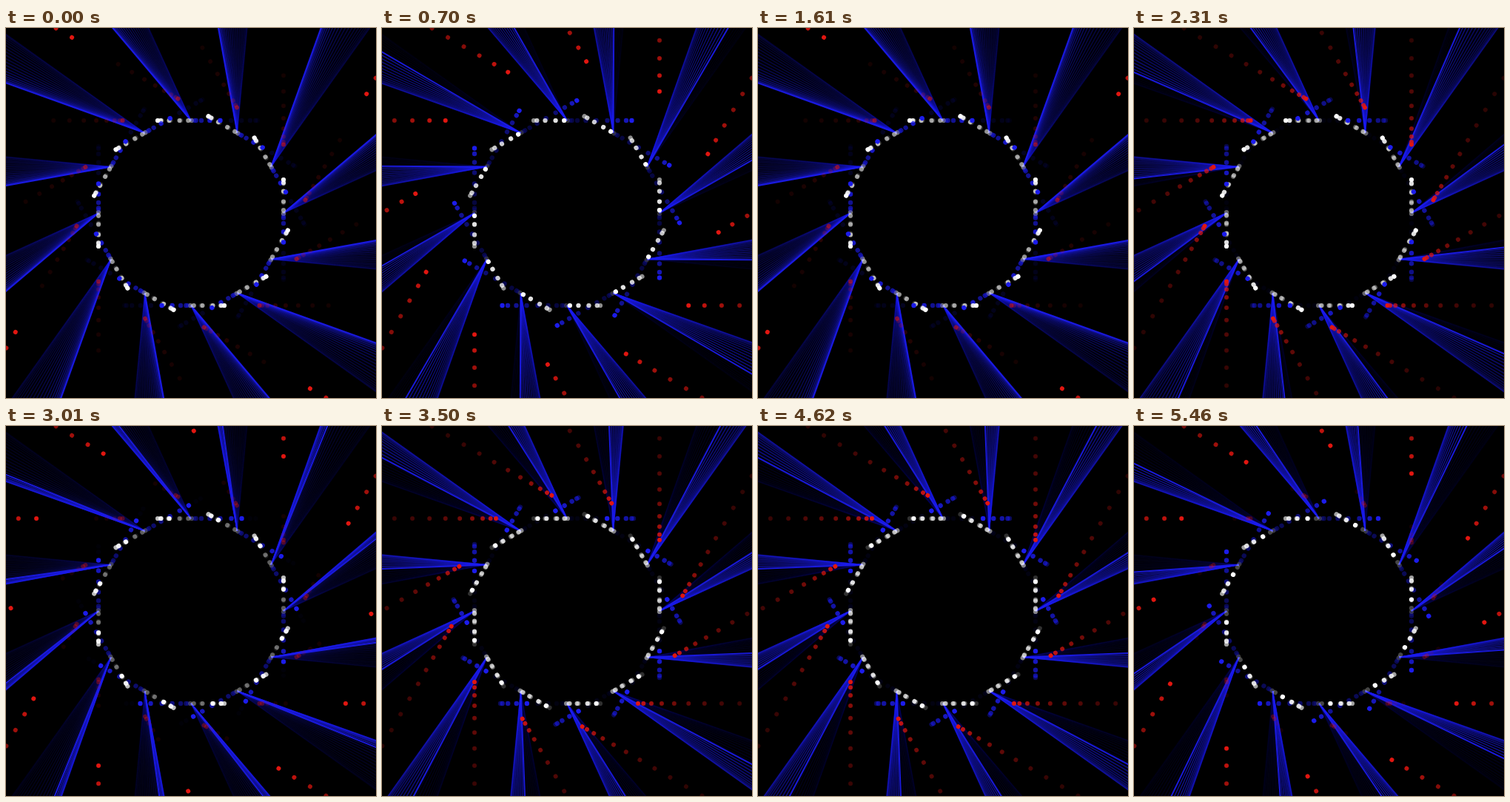
These frames come from a looping animation (500x500 px, 5530 ms). An HTML page with a canvas:

```html
<!DOCTYPE html>
<html>
<head>
<meta charset="utf-8">
<style>
html, body { margin: 0; width: 100%; height: 100%; overflow: hidden; background: #000; }
canvas { display: block; }
</style>
</head>
<body>
<canvas id="stage" width="500" height="500"></canvas>
<script>
const ctx = document.getElementById('stage').getContext('2d');
const STEP = 70, STEPS = 79, TRAIL = 14, ARMS = 12, RADIUS = 125;

// Every sweep restarts the same four swings; phase 0 lies LEAD steps after its start.
const sweeps = [-22, -5, 1, 18, 36, 52, 70], LEAD = 5;
const phaseAt = step => step - sweeps.findLast(s => s <= step) - LEAD;

// Beam angle in radians from the outward normal.
const beam = {
  rgb: '28,28,240', fade: 0.73, substeps: 4,
  angle: p => (-32.5 - 8 * Math.cos(0.55 * (p - 0.5))) * Math.PI / 180
};

// Dot offsets along the tangent of an arm.
const dots = [
  { rgb: '28,28,235', r: 3.2, fade: 0.78, x: p => 47 + 43 * Math.sin(0.35 * (p - 0.5)) },
  { rgb: '255,255,255', r: 3.1, fade: 0.83, x: p => -22 - 23 * Math.cos(0.62 * p) },
  { rgb: '225,22,16', r: 3, fade: 0.84, x: p => -258 + 166 * Math.sin(0.15 * p) }
];

function drawBeam(step, age) {
  const a = beam.angle(phaseAt(step));
  ctx.strokeStyle = `rgba(${beam.rgb},${(age ? 0.6 : 0.9) * beam.fade ** age})`;
  ctx.lineWidth = age ? 1.4 : 2;
  ctx.beginPath();
  ctx.moveTo(0, -RADIUS);
  ctx.lineTo(600 * Math.sin(a), -RADIUS - 600 * Math.cos(a));
  ctx.stroke();
}

function drawDot(dot, step, age) {
  ctx.fillStyle = `rgba(${dot.rgb},${dot.fade ** age})`;
  ctx.beginPath();
  ctx.arc(dot.x(phaseAt(step)), -RADIUS, dot.r, 0, 2 * Math.PI);
  ctx.fill();
}

function eachArm(draw) {
  for (let i = 0; i < ARMS; i++) {
    draw();
    ctx.rotate(2 * Math.PI / ARMS);
  }
}

function render(now) {
  const step = Math.floor(now / STEP) % STEPS;
  ctx.setTransform(1, 0, 0, 1, 0, 0);
  ctx.fillStyle = '#000';
  ctx.fillRect(0, 0, 500, 500);
  ctx.translate(250, 250);
  for (let i = TRAIL * beam.substeps; i >= 0; i--) {
    const age = i / beam.substeps;
    eachArm(() => drawBeam(step - age, age));
  }
  for (let age = TRAIL; age >= 0; age--) {
    eachArm(() => dots.forEach(dot => drawDot(dot, step - age, age)));
  }
}

const start = performance.now();
function loop() {
  render(performance.now() - start);
  requestAnimationFrame(loop);
}
loop();
</script>
</body>
</html>
```
